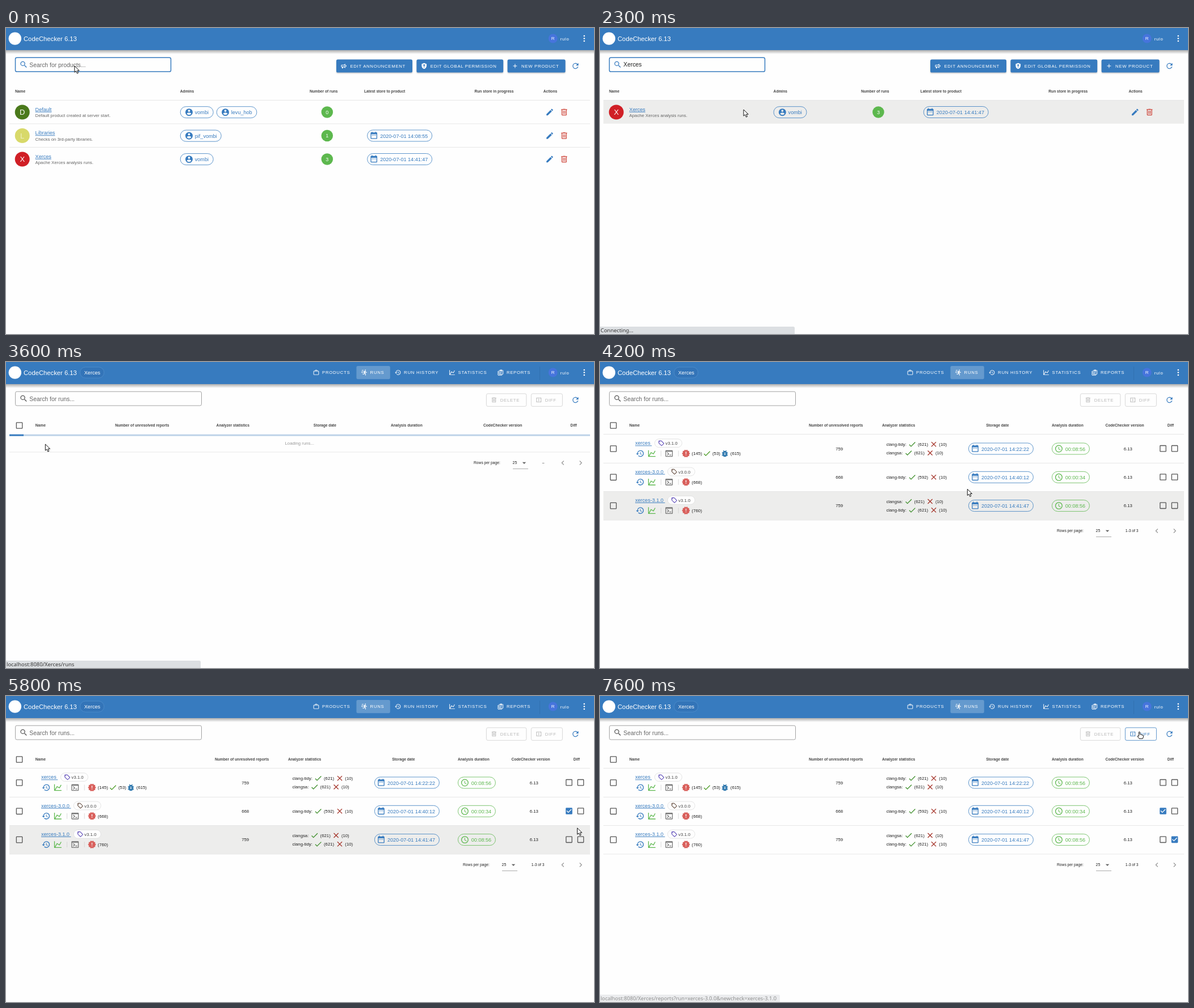
Recreate the animation shown at these times as an HTML page. Size 1036 by 540 pixels, loop 8000 ms.

```html
<!DOCTYPE html>
<html lang="en">
<head>
<meta charset="utf-8">
<title>Product and run list</title>
<style>
html, body { margin: 0; width: 100%; height: 100%; overflow: hidden; background: #fefefe; }
svg { display: block; font-family: "Liberation Sans", Arial, sans-serif; }
text { white-space: pre; }
.status { font-family: "Noto Sans", sans-serif; }
</style>
</head>
<body>
<svg id="stage" width="1036" height="540" viewBox="0 0 1036 540"></svg>
<script>
const BLUE = '#377bbf', GREEN = '#5db84e', RED = '#cf4a3f', INK = '#222', GREY = '#666', RULE = '#dedede';
const ICONS = {
  search: 'M9.5,3A6.5,6.5 0 0,1 16,9.5C16,11.11 15.41,12.59 14.44,13.73L14.71,14H15.5L20.5,19L19,20.5L14,15.5V14.71L13.73,14.44C12.59,15.41 11.11,16 9.5,16A6.5,6.5 0 0,1 9.5,3M9.5,5A4.5,4.5 0 0,0 9.5,14A4.5,4.5 0 0,0 9.5,5Z',
  refresh: 'M17.65,6.35C16.2,4.9 14.21,4 12,4A8,8 0 0,0 12,20C15.73,20 18.84,17.45 19.73,14H17.65C16.83,16.33 14.61,18 12,18A6,6 0 0,1 12,6C13.66,6 15.14,6.69 16.22,7.78L13,11H20V4Z',
  pencil: 'M20.71,7.04C21.1,6.65 21.1,6 20.71,5.63L18.37,3.29C18,2.9 17.35,2.9 16.96,3.29L15.12,5.12L18.87,8.87M3,17.25V21H6.75L17.81,9.93L14.06,6.18Z',
  trash: 'M9,3V4H4V6H5V19A2,2 0 0,0 7,21H17A2,2 0 0,0 19,19V6H20V4H15V3M7,6H17V19H7M9,8V17H11V8M13,8V17H15V8Z',
  user: 'M12,19.2C9.5,19.2 7.29,17.92 6,16C6.03,14 10,12.9 12,12.9C14,12.9 17.97,14 18,16C16.71,17.92 14.5,19.2 12,19.2M12,5A3,3 0 0,1 12,11A3,3 0 0,1 12,5M12,2A10,10 0 0,0 12,22A10,10 0 0,0 12,2Z',
  calendar: 'M9,10H7V12H9M13,10H11V12H13M17,10H15V12H17M19,3H18V1H16V3H8V1H6V3H5A2,2 0 0,0 3,5V19A2,2 0 0,0 5,21H19A2,2 0 0,0 21,19V5A2,2 0 0,0 19,3M19,19H5V8H19Z',
  clock: 'M12,20A8,8 0 0,0 12,4A8,8 0 0,0 12,20M12,2A10,10 0 0,1 12,22A10,10 0 0,1 12,2M12.5,7V12.25L17,14.92L16.25,16.15L11,13V7Z',
  box: 'M19,3H5A2,2 0 0,0 3,5V19A2,2 0 0,0 5,21H19A2,2 0 0,0 21,19V5A2,2 0 0,0 19,3M19,5V19H5V5Z',
  boxOn: 'M10,17L5,12L6.41,10.58L10,14.17L17.59,6.58L19,8M19,3H5A2,2 0 0,0 3,5V19A2,2 0 0,0 5,21H19A2,2 0 0,0 21,19V5A2,2 0 0,0 19,3Z',
  history: 'M13.5,8H12V13L16.28,15.54L17,14.33L13.5,12.25M13,3A9,9 0 0,0 4,12H1L4.96,16.03L9,12H6A7,7 0 1,1 8.06,16.94L6.64,18.36A9,9 0 1,0 13,3',
  chart: 'M16,11.78L20.24,4.45L21.97,5.45L16.74,14.5L10.23,10.75L5.46,19H22V21H2V3H4V17.54L9.5,8Z',
  console: 'M20,19V7H4V19M20,3A2,2 0 0,1 22,5V19A2,2 0 0,1 20,21H4A2,2 0 0,1 2,19V5A2,2 0 0,1 4,3M13,17V15H18V17M9.58,13L5.57,9H8.4L12.4,13L8.42,17H5.59Z',
  check: 'M21,7L9,19L3.5,13.5L4.91,12.09L9,16.17L19.59,5.59Z',
  close: 'M19,6.41L17.59,5L12,10.59L6.41,5L5,6.41L10.59,12L5,17.59L6.41,19L12,13.41L17.59,19L19,17.59L13.41,12Z',
  tag: 'M21.4,11.6L12.4,2.6L11,2H4L2,4V11L2.6,12.4L11.6,21.4L13,22L14.4,21.4L21.4,14.4L22,13M13,20L4,11V4H11L20,13M6.5,5A1.5,1.5 0 1,1 6.5,8A1.5,1.5 0 1,1 6.5,5Z',
  alert: 'M23,12L20.56,9.22L20.9,5.54L17.29,4.72L15.4,1.54L12,3L8.6,1.54L6.71,4.72L3.1,5.53L3.44,9.21L1,12L3.44,14.78L3.1,18.47L6.71,19.29L8.6,22.47L12,21L15.4,22.46L17.29,19.28L20.9,18.46L20.56,14.78M13,17H11V15H13M13,13H11V7H13Z',
  bug: 'M14,12H10V10H14M14,16H10V14H14M20,8H17.19L15.37,6.04L17,4.41L15.59,3L13.42,5.17H10.59L8.41,3L7,4.41L8.62,6.04L6.81,8H4V10H6V12H4V14H6V16H4V18H6.81C7.85,19.79 9.78,21 12,21C14.22,21 16.15,19.79 17.19,18H20V16H18V14H20V12H18V10H20Z',
  run: 'M16.5,5.5A2,2 0 0,0 16.5,1.5A2,2 0 0,0 16.5,5.5M12.9,19.4L13.9,15L16,17V23H18V15.5L15.9,13.5L16.5,10.5C17.89,12.09 19.89,13 22,13V11C20.24,11.03 18.6,10.11 17.7,8.6L16.7,7C16.34,6.4 15.7,6 15,6L14.2,6.1L9,8.3V13H11V9.6L12.8,8.9L11.2,17L6.3,16L5.9,18M3,7H7V9H3M4,3H10V5H4M2,11H7V13H2Z',
  horn: 'M12,8H4A2,2 0 0,0 2,10V14A2,2 0 0,0 4,16H5V20A1,1 0 0,0 6,21H8A1,1 0 0,0 9,20V16H12L17,20V4M15,15.6L13,14H4V10H13L15,8.4M21.5,12C21.5,13.71 20.54,15.26 19,16V8C20.53,8.75 21.5,10.3 21.5,12Z',
  shield: 'M12,1L3,5V11C3,16.55 6.84,21.74 12,23C17.16,21.74 21,16.55 21,11V5M12,6A3,3 0 0,1 13,11.8V18H11V11.8A3,3 0 0,1 12,6Z',
  plus: 'M19,13H13V19H11V13H5V11H11V5H13V11H19Z',
  bag: 'M20,6H16V4L14,2H10L8,4V6H4L2,8V19L4,21H20L22,19V8M10,4H14V6H10M4,8H20V19H4Z',
  report: 'M4,7V21H18V23H4L2,21V7M20,3H16.5L15,1H13L11.5,3H8L6,5V17L8,19H20L22,17V5M20,17H8V5H10V7H18V5H20M10,9V11H18V9M10,13V15H15V13Z',
  diff: 'M3,4H9V6H5V18H9V20H3ZM11,2H13V22H11ZM15,4H21V20H15V18H19V6H15Z',
  left: 'M15.41,16.58L10.83,12L15.41,7.41L14,6L8,12L14,18Z',
  right: 'M8.59,16.58L13.17,12L8.59,7.41L10,6L16,12L10,18Z',
  down: 'M7,10L12,15L17,10Z'
};
const esc = s => s.replace(/&/g, '&amp;');
const text = (x, y, s, size = 7.77, fill = INK, more = '') =>
  `<text x="${x}" y="${(y + size * .36).toFixed(2)}" font-size="${size}" fill="${fill}" ${more}>${esc(s)}</text>`;
const mid = (x, y, s, size, fill) => text(x, y, s, size, fill, 'text-anchor="middle"');
const head = (x, s, y = 112) => text(x, y, s, 6.65, '#444', 'font-weight="bold"');
const caps = (x, s, fill, y = 67) => text(x, y, s, 7.77, fill, 'letter-spacing=".7"');
const link = (x, y, s) => text(x, y, s, 9.07, BLUE, 'text-decoration="underline"');
const icon = (name, x, y, fill, size = 15.54, more = '') =>
  `<path transform="translate(${x - size / 2} ${y - size / 2}) scale(${size / 24})" d="${ICONS[name]}" fill="${fill}" fill-rule="evenodd" ${more}/>`;
const rect = (x, y, w, h, fill, rx = 0, more = '') =>
  `<rect x="${x}" y="${y}" width="${w}" height="${h}" rx="${rx}" fill="${fill}" ${more}/>`;
const dot = (x, y, r, fill, more = '') => `<circle cx="${x}" cy="${y}" r="${r}" fill="${fill}" ${more}/>`;
const rule = (y, x = 6, w = 1023) => rect(x, y - .35, w, .7, RULE);
const group = (id, s) => `<g id="${id}">${s}</g>`;
const chip = (x, y, w, color, name, ix, tx, label) =>
  rect(x + .4, y - 10, w, 20, 'none', 10, `stroke="${color}" stroke-width=".8"`) +
  icon(name, x + ix, y, color) + text(x + tx, y + .4, label, 9.07, color);
const userChip = (x, y, w, name) => chip(x, y, w, BLUE, 'user', 15.7, 26, name);
const dateChip = (x, y, date) => chip(x, y, 114, BLUE, 'calendar', 12, 23, date);

function solidButton(x, w, name, label) {
  return rect(x, 57, w, 23, '#000', 2.6, 'opacity=".22" filter="url(#soft)"') +
    rect(x, 55.5, w, 23, BLUE, 2.6) + icon(name, x + 13.3, 67, '#fff', 11.65) + caps(x + 24.4, label, '#fff');
}
function lineButton(x, w, name, label, color, border) {
  return rect(x + .4, 55.9, w, 22.4, '#fefefe', 2.6, `stroke="${border}" stroke-width=".8"`) +
    icon(name, x + 13.8, 67, color, 11.65) + caps(x + 24.7, label, color);
}
const searchBox = (w, stroke, width, tint) =>
  rect(16.5, 52.2, w, 24.8, '#fefefe', 2.6, `stroke="${stroke}" stroke-width="${width}"`) + icon('search', 31.2, 64.5, tint);

function productHead(cols) {
  const names = ['Admins', 'Number of runs', 'Latest store to product', 'Run store in progress', 'Actions'];
  return head(16, 'Name') + names.map((s, i) => head(cols[i], s)).join('') + rule(127.5);
}
function product(y, color, tint, title, note, count, cx, ax) {
  return dot(28.7, y, 13, color) + mid(28.7, y, title[0], 12.95, tint) +
    link(51.6, y - 5, title) + text(51.6, y + 5.8, note, 7.77, GREY) +
    dot(cx, y, 10.3, GREEN) + mid(cx, y, count, 9.07, '#fff') +
    icon('pencil', ax, y, BLUE) + icon('trash', ax + 25.4, y, RED);
}
const xerces = (y, cx, ax) => product(y, '#d01f26', '#fff', 'Xerces', 'Apache Xerces analysis runs.', '3', cx, ax);

function stats(x, y, tool, ok) {
  const w = tool === 'clangsa:' ? 29.2 : 35.6;
  return text(x, y - .3, tool) + icon('check', x + w + 10, y, '#3f8f2c') + text(x + w + 20, y - .3, `(${ok})`) +
    icon('close', x + w + 48, y, '#a5362c') + text(x + w + 57.3, y - .3, '(10)');
}
function runRow(y, r) {
  const n = y - 9.9, m = y + 8.5;
  const tagX = r.tagX;
  return icon('box', 23.5, y, '#555') + link(62, n, r.name + '\u00a0') +
    rect(tagX + .4, n - 7.3, 48, 14.8, '#fefefe', 7.4, `stroke="${RULE}" stroke-width=".8"`) +
    icon('tag', tagX + 12, n + .2, r.tagColor, 11.65) + text(tagX + 19.3, n + .3, r.tag, 7.77, '#444') +
    icon('history', 70.6, m, BLUE) + icon('chart', 91.3, m, GREEN) + icon('console', 121.7, m, '#777') +
    rect(107, m - 5, .7, 10, '#ccc') + rect(137.8, m - 5, .7, 10, '#ccc') +
    icon('alert', 151.5, m, '#d9605c') + text(161.6, m, r.alerts) +
    mid(421.7, y, r.total, 7.77, INK) + dateChip(649, y, r.date) +
    chip(796, y, 66, GREEN, 'clock', 12.4, 23.8, r.time) + text(922.8, y, '6.13') +
    icon('box', 992, y - .3, '#555') + icon('box', 1012.5, y - .3, '#555');
}
function pager(y, dx, range, rx) {
  return text(805 + dx, y, 'Rows per page:', 6.7) + text(873.6 + dx, y, '25', 6.9) + icon('down', 894 + dx, y, '#666') +
    rect(874 + dx, y + 10, 27, .7, '#888') + text(rx, y, range, 6.7) +
    icon('left', 981, y, '#999') + icon('right', 1012.5, y, '#999');
}
const runHead = (cols, y = 112) =>
  ['Name', 'Number of unresolved reports', 'Analyzer statistics', 'Storage date', 'Analysis duration', 'CodeChecker version', 'Diff']
    .map((s, i) => head(cols[i], s, y)).join('') + icon('box', 23.5, 112, '#555');

const bar = rect(0, 39, 1036, 7, 'url(#shade)') + rect(0, 0, 1036, 39, BLUE) +
  dot(15.8, 18.6, 11.2, '#fff') + text(31, 18.5, 'CodeChecker 6.13', 11.25, '#fff') +
  dot(963.7, 18.5, 8, '#4674dc') + mid(963.7, 18.5, 'R', 8, '#fff') + caps(976.8, 'rulo', '#fff', 18.8) +
  [14, 18.5, 23].map(y => dot(1018.8, y, 1.35, '#fff')).join('');

const nav = rect(130.4, 9, 42.4, 19.2, '#3374b8', 9.6, 'stroke="#5592cf" stroke-width=".7"') +
  text(137.8, 18.8, 'Xerces', 9.07, '#fff') + rect(617.4, 7, 59.4, 23.2, '#fff', 2.6, 'opacity=".23"') +
  [[546.5, 'bag', 'PRODUCTS'], [631, 'run', 'RUNS'], [690.5, 'history', 'RUN HISTORY'], [786, 'chart', 'STATISTICS'], [871.3, 'report', 'REPORTS']]
    .map(([x, i, s]) => icon(i, x, 18.5, '#fff', 11.65) + caps(x + 10.6, s, '#fff', 18.5)).join('') +
  rect(940, 8, .7, 24, '#2f6cab');

const products = searchBox(274, BLUE, 1.5, BLUE) + solidButton(582, 134, 'horn', 'EDIT ANNOUNCEMENT') +
  solidButton(723.4, 152.8, 'shield', 'EDIT GLOBAL PERMISSION') + solidButton(883.6, 102, 'plus', 'NEW PRODUCT') +
  group('hint', text(41.3, 64.9, 'Search for products...', 10.36, GREY)) +
  `<text id="typed" x="41.3" y="68" font-size="10.36" fill="${INK}"></text>` +
  rect(0, 58.5, .8, 11.5, '#222', 0, 'id="caret"');

const allProducts = productHead([306.8, 535, 631, 825.5, 946.8]) + rule(169) + rule(210.5) +
  product(148.5, '#4b7a1c', '#fff', 'Default', 'Default product created at server start.', '0', 565.8, 958) +
  product(190, '#d8d96a', '#eeeec4', 'Libraries', 'Checks on 3rd-party libraries.', '1', 565.8, 958) + xerces(231.5, 565.8, 958) +
  userChip(306.8, 148.7, 58, 'vombi') + userChip(370.8, 148.7, 70.6, 'levu_hob') +
  userChip(306.8, 190.2, 72, 'pif_vombi') + userChip(306.8, 231.6, 58, 'vombi') +
  dateChip(636.2, 190, '2020-07-01 14:08:55') + dateChip(636.2, 231.5, '2020-07-01 14:41:47');

const oneProduct = productHead([305.6, 460, 564.6, 790.3, 931.4]) + xerces(148.5, 490.4, 942.8) +
  userChip(305.6, 148.7, 58, 'vombi') + dateChip(569.8, 148.5, '2020-07-01 14:41:47');

const runsTop = nav + searchBox(328, '#999', .9, '#555') + text(41.3, 64.9, 'Search for runs...', 10.36, GREY) +
  lineButton(846, 70.5, 'trash', 'DELETE', '#b8b8b8', '#cfcfcf') +
  group('diffOff', lineButton(925, 55, 'diff', 'DIFF', '#b8b8b8', '#cfcfcf')) +
  group('diffOn', lineButton(925, 55, 'diff', 'DIFF', BLUE, BLUE));

const loading = runHead([51.8, 192.2, 370.6, 541.8, 678, 841, 994.6]) + rect(6, 127.7, 1023, 2.9, '#bcd2e8') +
  rect(6, 127.7, 25, 2.9, BLUE, 0, 'id="progress"') + mid(517.2, 143.3, 'Loading runs...', 7.77, '#999') +
  rule(159) + pager(178, 19, '–', 944.8);

const rows = [
  { name: 'xerces', tag: 'v3.1.0', tagX: 96, tagColor: '#4a35b0', alerts: '(145)', total: '759', date: '2020-07-01 14:22:22', time: '00:08:56' },
  { name: 'xerces-3.0.0', tag: 'v3.0.0', tagX: 118.8, tagColor: '#5a4032', alerts: '(668)', total: '668', date: '2020-07-01 14:40:12', time: '00:00:34' },
  { name: 'xerces-3.1.0', tag: 'v3.1.0', tagX: 118.8, tagColor: '#4a35b0', alerts: '(760)', total: '759', date: '2020-07-01 14:41:47', time: '00:08:56' }
];
const tick = (id, x, y) => group(id, rect(x - 6.5, y - 6.5, 13, 13, '#fefefe') + icon('boxOn', x, y, BLUE));
const loaded = runHead([51.8, 368, 497, 680.2, 796, 890.4, 999.8]) + [127.5, 178.3, 228.6, 279].map(y => rule(y)).join('') +
  rows.map((r, i) => runRow(153 + 50.3 * i, r)).join('') +
  icon('check', 188.3, 161.5, '#4a9a25') + text(198, 161.5, '(53)') + icon('bug', 220, 161.5, '#2f78ae') + text(229.8, 161.5, '(615)') +
  stats(504.4, 145.2, 'clang-tidy:', 621) + stats(504.4, 160.5, 'clangsa:', 621) + stats(504.4, 203.2, 'clang-tidy:', 592) +
  stats(504.4, 246, 'clangsa:', 621) + stats(504.4, 261.3, 'clang-tidy:', 621) +
  tick('tickA', 992, 203) + tick('tickB', 1012.5, 253.3) +
  dot(0, 0, 13, BLUE, 'id="ripple" opacity=".16"') + pager(298, 0, '1-3 of 3', 925.8);

const pen = 'fill="#fff" stroke="#111" stroke-width="1" stroke-linejoin="round"';
const arrow = `<path id="arrow" d="M0,0V11.2L2.6,8.9L4.5,13.2L6.5,12.3L4.7,8.2H8.3Z" ${pen}/>`;
const hand = `<path id="hand" d="M-1,1Q0,-.5 1,1V5H2.5L4,5.6L5.6,6.2L7,7V10L5.8,12.4H-.3L-3.4,8.4Q-3.6,6.8 -1,8.2Z" ${pen}/>`;

const stage = document.getElementById('stage');
stage.innerHTML = `<defs><linearGradient id="shade" x2="0" y2="1"><stop stop-color="#000" stop-opacity=".32"/>
  <stop offset="1" stop-color="#000" stop-opacity="0"/></linearGradient>
  <filter id="soft" x="-10%" y="-30%" width="120%" height="170%"><feGaussianBlur stdDeviation="1.1"/></filter></defs>` +
  rect(0, 0, 1036, 540, '#fefefe') + rect(6, 0, 1023, 0, '#ededec', 0, 'id="hover"') + bar +
  group('products', products) + group('allProducts', allProducts) + group('oneProduct', oneProduct) +
  group('runs', runsTop) + group('loading', loading) + group('loaded', loaded) +
  icon('refresh', 1003.4, 67, BLUE) +
  group('status', rect(-3, 527, 346, 16, '#dcdfe2', 2.5, 'id="statusBox"') + '<text id="statusText" class="status" x="1" y="537.4" fill="#333"></text>') +
  group('cursor', arrow + hand);

const el = {};
stage.querySelectorAll('[id]').forEach(n => el[n.id] = n);
const show = (id, on) => el[id].style.display = on ? '' : 'none';
const set = (id, attrs) => { for (const k in attrs) el[id].setAttribute(k, attrs[k]); };

// Last value whose time has come.
const at = (list, t) => list.reduce((v, [time, value]) => t >= time ? value : v, list[0][1]);

const TYPED = [[0, ''], [700, 'X'], [1100, 'Xe'], [1400, 'Xerc'], [1500, 'Xerce'], [1700, 'Xerces']];
const STATUS = [[0, ''], [2300, 'Connecting...'], [2500, ''], [2900, 'localhost:8080/Xerces'], [3300, 'localhost:8080/Xerces/runs'],
  [4100, ''], [7600, 'localhost:8080/Xerces/reports?run=xerces-3.0.0&newcheck=xerces-3.1.0']];
const HOVER = [[0, 0], [2300, 4], [3500, 0], [4100, 2], [4200, 3], [4700, 2], [5700, 3], [6700, 2], [7000, 1], [7100, 0]];
const BANDS = [[0, 0], [127.8, 50.2], [178.6, 49.8], [229, 49.8], [127.8, 41]];
const HAND = [[0, false], [2900, true], [3300, false], [5300, true], [5700, false], [6000, true], [6500, false], [7500, true]];
const PATH = [[0, 120.8, 67], [2100, 120.8, 67], [2300, 253, 144], [2400, 248, 146], [3000, 76, 146], [3100, 69.3, 145], [3600, 69.3, 145],
  [3700, 171.5, 157], [3800, 171.5, 157], [3900, 617, 226], [4000, 617, 226], [4100, 634, 229], [4200, 647.3, 224.3], [4300, 652, 230],
  [4500, 652, 230], [4700, 690, 224], [5400, 991, 203], [5500, 992, 204], [5800, 1006.6, 233], [6000, 1012, 251], [6400, 1012, 251],
  [6800, 981.3, 220], [7200, 952, 68], [7300, 950.3, 62.8], [8000, 950.3, 62.8]];

function pointer(t) {
  const i = PATH.findIndex(p => p[0] > t), a = PATH[i - 1], b = PATH[i];
  const k = (t - a[0]) / (b[0] - a[0]);
  return [a[1] + (b[1] - a[1]) * k, a[2] + (b[2] - a[2]) * k];
}

function draw(ms) {
  const t = Math.floor(ms % 8000 / 100) * 100;
  const runs = t >= 3500, word = at(TYPED, t), status = at(STATUS, t);
  show('products', !runs);
  show('allProducts', t < 2300);
  show('oneProduct', t >= 2300 && !runs);
  show('runs', runs);
  show('loading', runs && t < 3700);
  show('loaded', t >= 3700);

  show('hint', !word);
  el.typed.textContent = word;
  show('caret', t >= 500 && t < 2200);
  set('caret', { x: 41.3 + (word ? el.typed.getComputedTextLength() : 0) });
  set('progress', { width: t < 3600 ? 6 : 25 });

  show('diffOn', t >= 6500);
  show('diffOff', t < 6500);
  show('tickA', t >= 5500);
  show('tickB', t >= 6200);
  show('ripple', t === 5500 || t === 6200);
  set('ripple', t < 6000 ? { cx: 992, cy: 203 } : { cx: 1012.5, cy: 253.3 });

  const [y, height] = BANDS[at(HOVER, t)];
  set('hover', { y, height });

  const late = t >= 7600;
  show('status', status);
  el.statusText.textContent = status;
  set('statusText', { 'font-size': late ? 9.2 : 9.4 });
  set('statusBox', { width: late ? 320 : 346 });
  set('status', { opacity: late ? .55 : 1 });

  const [px, py] = pointer(t), over = at(HAND, t);
  show('cursor', t < 500 || t >= 2200);
  show('arrow', !over);
  show('hand', over);
  set('cursor', { transform: `translate(${px.toFixed(1)} ${py.toFixed(1)})` });
}

const start = performance.now();
function loop() {
  draw(performance.now() - start);
  requestAnimationFrame(loop);
}
loop();
</script>
</body>
</html>
```
